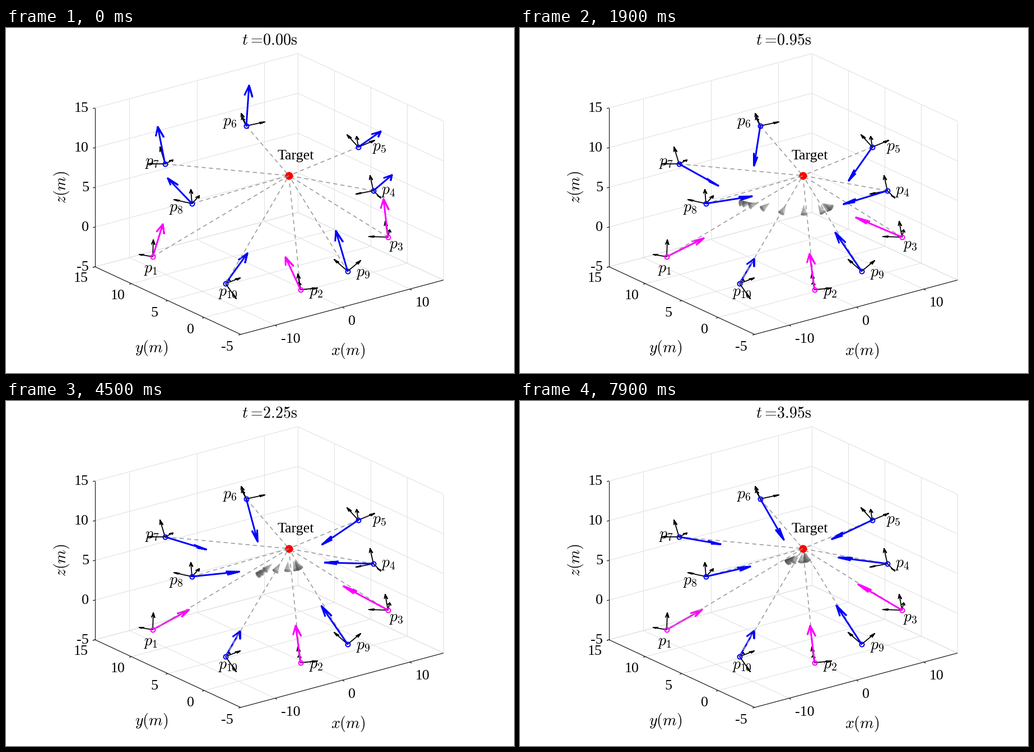
These frames come from a looping animation (907x617 px, 8000 ms). A matplotlib script:

```python
import numpy as np
import matplotlib.pyplot as plt
from matplotlib.animation import FuncAnimation
from matplotlib.collections import LineCollection, PolyCollection

W, H, DPI = 907, 617, 72          # at 72 dpi one point is one pixel
FRAMES, INTERVAL, DT = 80, 100, 0.05
BLUE, MAGENTA = "#0000ff", "#ff00ff"

plt.rcParams.update({"mathtext.fontset": "cm", "font.family": "Liberation Serif"})
fig = plt.figure(figsize=(W / DPI, H / DPI), dpi=DPI, facecolor="white")
ax = fig.add_axes([0, 0, 1, 1])
ax.set(xlim=(0, W), ylim=(H, 0))
ax.axis("off")

# Oblique view: pixels per metre along x, y and z
VIEW = np.array([[12.03, -13.0, 0], [-3.23, -6.05, -14.2]])
LIFT = np.linalg.pinv(VIEW)
CAMERA = -np.cross(VIEW[0], VIEW[1])
CAMERA /= np.linalg.norm(CAMERA)
X0, X1, Y0, Y1, Z0, Z1 = -15.1, 15, -5, 15, -5, 15


def project(x, y, z):
    return np.array([419, 548]) + VIEW @ (x - X0, y - Y0, z - Z0)


def label(x, y, s, size=26, ha="center", va="baseline", **kw):
    return ax.text(x, y, s, size=size, ha=ha, va=va, zorder=9, **kw)


def draw_axes():
    grid, ticks = [], []
    for x in (X0, -10, 0, 10, X1):
        grid += [[project(x, Y0, Z0), project(x, Y1, Z0)],
                 [project(x, Y1, Z0), project(x, Y1, Z1)]]
    for y in (Y0, 0, 5, 10, Y1):
        grid += [[project(X0, y, Z0), project(X1, y, Z0)],
                 [project(X1, y, Z0), project(X1, y, Z1)]]
        p = project(X0, y, Z0)
        ticks.append([p, p + (-4, 1.2)])
    for z in (-5, 0, 5, 10, 15):
        grid += [[project(X0, Y1, z), project(X1, Y1, z)],
                 [project(X1, Y1, z), project(X1, Y0, z)]]
        p = project(X0, Y1, z)
        ticks.append([p, p + (-4, 1)])
        label(148, p[1] + 7, str(z), ha="right")
    for x in (-10, 0, 10):
        p = project(x, Y0, Z0)
        ticks.append([p, p + (3.5, 2)])
    corners = [project(X0, Y1, Z1), project(X0, Y1, Z0),
               project(X0, Y0, Z0), project(X1, Y0, Z0)]
    edges = list(zip(corners, corners[1:]))
    ax.add_collection(LineCollection(grid, colors="#dfdfdf", linewidths=1, zorder=1))
    ax.add_collection(LineCollection(edges + ticks, colors="#1a1a1a",
                                     linewidths=1.2, zorder=2))
    for i, y in enumerate((15, 10, 5, 0, -5)):
        label(134 + 65.3 * i, 454 + 30.8 * i, str(y))
    for x, px, py in ((-10, 508, 563), (0, 617, 531), (10, 744, 498)):
        label(px, py, str(x))
    label(611, 585, "$x(m)$", 28)
    label(260, 580, "$y(m)$", 28)
    label(99, 285, "$z(m)$", 28, va="center", rotation=90)


def arrow_path(tail, d, length):
    """Shaft and open head; the head's wings lie level in space."""
    v = LIFT @ d
    v = v - CAMERA * np.sqrt(max(length ** 2 - v @ v, 0))
    side = np.array([v[1], -v[0], 0])
    side *= length / (np.hypot(v[0], v[1]) + 1e-9)
    tip = tail + d
    a, b = (tip + VIEW @ (-0.26 * v + k * side) for k in (0.08, -0.08))
    return np.array([tail, tip, a, tip, b])


def warp(t):
    return np.log1p(np.asarray(t) / 0.4)


def track(times, keys):
    """Monotone cubic through the keys on a logarithmic clock."""
    s, keys = warp(times), np.asarray(keys, float)
    h = np.diff(s)
    sec = np.diff(keys, axis=0) / h.reshape(-1, *[1] * (keys.ndim - 1))
    m = np.concatenate([sec[:1], sec])
    a, b = sec[:-1], sec[1:]
    same = a * b > 0
    m[1:-1] = np.where(same, 2 * a * b / np.where(same, a + b, 1), 0)

    def at(t):
        x = warp(t)
        if x < s[0]:
            return keys[0] + m[0] * (x - s[0])
        j = int(np.clip(np.searchsorted(s, x) - 1, 0, len(h) - 1))
        u = (x - s[j]) / h[j]
        ease = u * u * (3 - 2 * u)
        return (keys[j] * (1 - ease) + keys[j + 1] * ease
                + h[j] * (u * (1 - u) ** 2 * m[j] - u * u * (1 - u) * m[j + 1]))
    return at


GOAL = np.array([505, 264])
POS = np.array([(262, 409), (526, 468), (682, 374), (656, 291), (629, 213),
                (429, 175), (284, 243), (332, 314), (610, 435), (392, 457)])
NAMES = [(245, 437), (540, 478), (683, 394), (669, 297), (653, 219),
         (386, 174), (247, 246), (290, 328), (624, 444), (378, 479)]
# Body axes, as tip offsets from each agent
TRIADS = [
    [(-24, -4), (1, -30)],
    [(-5, -28), (30, -3), (-3, -13)],
    [(-34, -1), (-5, -28), (3, -13)],
    [(-31, 6), (-6, -27), (13, 13)],
    [(-20, -22), (-3, -19), (29, -12)],
    [(33, -7), (-9, -22), (-8, -15)],
    [(-31, 0), (-9, -30), (14, -7)],
    [(-32, -7), (-2, -25), (13, -14)],
    [(-24, -21), (23, -19)],
    [(26, -10), (19, 27), (7, -7)],
]
# Pointing arrows: tip positions at a few moments
AIM_TIMES = [0, 0.35, 0.95, 1.75, 3.95]
AIM_TIPS = np.array([
    [(280, 351), (328, 373), (328, 376), (327, 374), (325, 373)],
    [(499, 410), (513, 404), (517, 404), (517, 402), (518, 402)],
    [(674, 306), (608, 323), (600, 339), (602, 333), (604, 328)],
    [(689, 263), (624, 335), (578, 315), (570, 294), (569, 280)],
    [(669, 185), (638, 290), (587, 273), (569, 261), (557, 247)],
    [(434, 103), (367, 199), (418, 246), (440, 251), (471, 248)],
    [(271, 177), (343, 256), (354, 282), (357, 270), (358, 256)],
    [(289, 269), (291, 243), (414, 301), (417, 307), (411, 296)],
    [(589, 363), (579, 361), (563, 366), (563, 367), (565, 366)],
    [(431, 403), (417, 417), (418, 413), (418, 412), (418, 411)],
])
rel = (AIM_TIPS - POS[:, None]).transpose(1, 0, 2)
aim_angle = track(AIM_TIMES, np.unwrap(np.arctan2(rel[..., 1], rel[..., 0]), axis=0))
aim_length = track(AIM_TIMES, np.hypot(rel[..., 0], rel[..., 1]))

# Cones: an arc of nodes closing in on the goal, cones spread along it
arc = track(AIM_TIMES[1:], [
    [(-151, 16), (-103, 76), (-53, 92), (6, 98), (63, 89), (97, 76)],
    [(-105, 49), (-67, 55), (-35, 61), (2, 62), (32, 60), (45, 54)],
    [(-63, 48), (-45, 40), (-24, 42), (-2, 40), (15, 38), (22, 36)],
    [(-23, 20), (-20, 19), (-13, 18), (-2, 17), (4, 16), (6, 15)],
])
SPREAD = [0, 0.15, 0.45, 1, 2, 3, 4, 4.7, 4.9, 5]
TWIST = np.radians([51, 40, 22, 3, 0, 0, -6, -35, -45, -45])


def rim(lo, hi, n):
    a = np.linspace(lo, hi, n)
    return np.column_stack([-7 - 2.5 * np.cos(a), 6 * np.sin(a)])


front = rim(-np.pi / 2, np.pi / 2, 9)
FACETS = [rim(0, 2 * np.pi, 17)]
FACETS += [np.array([(10, 0), p, q]) for p, q in zip(front, front[1:])]


def cone_shapes(t):
    nodes = arc(t)
    offsets = np.column_stack([np.interp(SPREAD, range(6), nodes[:, c])
                               for c in (0, 1)])
    fade = min(np.exp(-1.2 * (t - 0.35)), 1.3)
    polys, colors = [], []
    for k, (o, twist) in enumerate(zip(offsets, TWIST)):
        a = np.arctan2(-o[1], -o[0]) + twist * fade
        rot = np.array([[np.cos(a), np.sin(a)], [-np.sin(a), np.cos(a)]])
        for j, facet in enumerate(FACETS):
            polys.append(GOAL + o + facet @ rot)
            g = 0.4 if j == 0 else 0.12 + 0.055 * j + 0.02 * min(k, 5)
            colors.append((g, g, g, 0.62))
    return polys, colors


draw_axes()
aims = []
for i, (p, triad, name) in enumerate(zip(POS, TRIADS, NAMES)):
    color = MAGENTA if i < 3 else BLUE
    ax.plot(*zip(p, GOAL), color="#999999", lw=1.6, dashes=(4.6, 3.6),
            zorder=6.5 if i in (0, 9) else 3)
    for d in triad:
        ax.plot(*arrow_path(p, np.array(d), 2).T, color="black", lw=1.8, zorder=5)
    aims += ax.plot([], [], color=color, lw=3, zorder=6,
                    solid_joinstyle="round", solid_capstyle="butt")
    ax.plot(*p, "o", ms=8, mfc="none", mec=color, mew=2, zorder=7)
    label(*name, "$p_{%d}$" % (i + 1), 28, ha="left")
ax.plot(*GOAL, "o", ms=14, color="red", mew=0, zorder=4)
label(517, 235, "Target")
title = label(470.5, 30, "", 28)
cones = ax.add_collection(PolyCollection([], linewidths=0, zorder=4.5))


def update(i):
    t = i * DT
    title.set_text(r"$t=\!\mathrm{%.2fs}$" % t)
    for line, p, a, r in zip(aims, POS, aim_angle(t), aim_length(t)):
        d = r * np.array([np.cos(a), np.sin(a)])
        line.set_data(*arrow_path(p, d, 5).T)
    polys, colors = cone_shapes(t) if i else ([], [])
    cones.set_verts(polys)
    cones.set_facecolor(colors)
    return [title, cones, *aims]


anim = FuncAnimation(fig, update, frames=FRAMES, interval=INTERVAL,
                     repeat=True, repeat_delay=0, blit=False)
plt.show()
```
